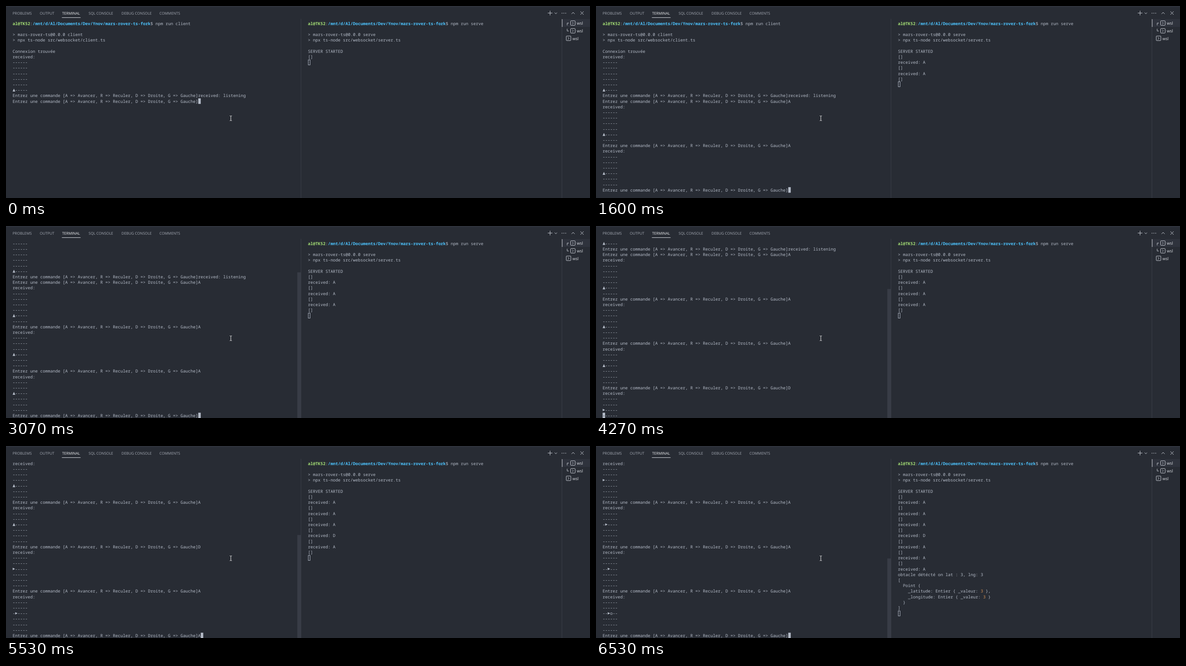
These frames come from a looping animation (1280x422 px, 8000 ms). An HTML page:

```html
<!DOCTYPE html>
<html lang="fr">
<head>
<meta charset="utf-8">
<title>Rover terminal</title>
<style>
  html, body { margin: 0; width: 100%; height: 100%; overflow: hidden; background: #282c34; }
  svg { display: block; }
  text { white-space: pre; text-rendering: geometricPrecision; }
  .term { font: 500 9.163px "Noto Sans Mono", "DejaVu Sans Mono", monospace; font-variant-ligatures: none; fill: #b4bbc7; }
  .ui { font: 8.1px "Open Sans", "Noto Sans", sans-serif; fill: #a4a9b3; }
  .ui .on { fill: #f0f1f3; }
  .ui .list { font-size: 9px; fill: #dcdfe4; }
  .user { font-weight: 700; fill: #a5e075; }
  .path { font-weight: 700; fill: #4dc4ff; }
  .num { fill: #d18f52; }
  .icon { fill: none; stroke: #c8ccd4; }
</style>
</head>
<body>
<svg width="1280" height="422" viewBox="0 0 1280 422">
  <rect width="1280" height="422" fill="#282c34"/>
  <rect y="1" width="1280" height="1" fill="#383c46"/>
  <g id="tabs" class="ui"></g>
  <rect x="122.5" y="25" width="41" height="1" fill="#d7dae0"/>
  <path d="M646.5 28V422M1218.5 28V422" stroke="#3a3e48"/>
  <rect x="1219" y="29" width="61" height="17" fill="#2f333d"/>
  <rect x="1218.5" y="29" width="1" height="17" fill="#d7dae0"/>
  <path class="icon" d="M1187.5 15.5h10M1192.5 10.5v10M1202.5 14.5l2.7 2.7 2.7-2.7M1239.5 17.5l3.5-3.5 3.5 3.5M1259 12l7 7M1266 12l-7 7"/>
  <path d="M1218 15h1.4v1.4h-1.4zM1222 15h1.4v1.4h-1.4zM1226 15h1.4v1.4h-1.4z" fill="#c8ccd4"/>
  <path class="icon" d="M1233.5 37.5h-3.5v5M1230 50v5h3.5"/>
  <g id="shells" class="ui"></g>
  <g id="client" class="term"></g>
  <g id="server" class="term"></g>
  <path d="M490.5 241.5h1.5l.8.8.8-.8h1.5M492.8 242v9.5M490.5 252h1.5l.8-.8.8.8h1.5" fill="none" stroke="#f2f2f2"/>
</svg>
<script>
const LOOP = 8000, ROWS = 32, COL = 5.498, PITCH = 12.2, TOP = 32.2;
const CLIENT_X = 14.5, SERVER_X = 661.7;
const ASK = "Entrez une commande [A => Avancer, R => Reculer, D => Droite, G => Gauche]";
const $ = id => document.getElementById(id);

// Each order: key, when it is typed, when output begins and ends, rover pose afterwards
const orders = [
  { key: "A", typed: 200, begin: 670, end: 670, row: 4, col: 0, rover: "▲" },
  { key: "A", typed: 1270, begin: 1530, end: 1600, row: 3, col: 0, rover: "▲" },
  { key: "A", typed: 2870, begin: 3070, end: 3070, row: 2, col: 0, rover: "▲" },
  { key: "D", typed: 4000, begin: 4270, end: 4330, row: 2, col: 0, rover: "►" },
  { key: "A", typed: 4870, begin: 5200, end: 5200, row: 2, col: 1, rover: "►" },
  { key: "A", typed: 5530, begin: 5800, end: 5870, row: 2, col: 2, rover: "►" },
  { key: "A", typed: 6270, begin: 6530, end: 6530, row: 2, col: 2, rover: "►", obstacle: true }
];

const span = (name, s) => `<tspan class="${name}">${s}</tspan>`;
const shell = cmd => span("user", "al@TK52") + ":" +
  span("path", "/mnt/d/Al/Documents/Dev/Ynov/mars-rover-ts-fork") + "$ npm run " + cmd;
const intro = (cmd, file) => [shell(cmd), "", `> mars-rover-ts@0.0.0 ${cmd}`,
  `> npx ts-node src/websocket/${file}.ts`, ""];

function map({ row, col, rover, obstacle }) {
  return Array.from({ length: 6 }, (_, r) => {
    if (r !== row) return "------";
    const cells = [..."------"];
    cells[col] = rover;
    if (obstacle) cells[col + 1] = "o";
    return cells.join("");
  });
}

const coordinate = name => `    _${name}: Entier { _valeur: ${span("num", 3)} }`;
const obstacleReport = ["obtacle détécté on lat : 3, lng: 3", "[", "  Point {",
  coordinate("latitude") + ",", coordinate("longitude"), "  }", "]"];

function clientState(t) {
  const lines = [...intro("client", "client"), "Connexion trouvée", "received:",
    ...map({ row: 5, col: 0, rover: "▲" }), ASK + "received: listening", ASK];
  let cursor = ASK.length;
  for (const o of orders) {
    if (t < o.typed) break;
    lines[lines.length - 1] += o.key;
    cursor = ASK.length + 1;
    if (t < o.begin) break;
    const grid = map(o);
    lines.push("received:");
    if (t < o.end) {
      lines.push(...grid.slice(0, 4));
      cursor = 0;
      break;
    }
    lines.push(...grid, ASK);
    cursor = ASK.length;
  }
  return { lines, cursor };
}

function serverLines(t) {
  const lines = [...intro("serve", "server"), "SERVER STARTED", "[]"];
  for (const o of orders) {
    if (t >= o.end) lines.push("received: " + o.key, ...(o.obstacle ? obstacleReport : ["[]"]));
  }
  return lines;
}

const rowTop = row => TOP + row * PITCH;

function drawLine(line, x, row) {
  const y = rowTop(row);
  const at = line.search(/[▲►]/);
  let arrow = "";
  if (at >= 0) {
    const ax = x + at * COL;
    arrow = line[at] === "▲"
      ? `<path d="M${ax} ${y + 9.4}h5.8l-2.9 -6.6z"/>`
      : `<path d="M${ax + .2} ${y + 3.6}v5.2l5.2 -2.6z"/>`;
  }
  return `<text x="${x}" y="${y + 9.5}">${line.replace(/[▲►]/, " ")}</text>${arrow}`;
}

function drawClient(t) {
  const { lines, cursor } = clientState(t);
  const first = Math.max(0, lines.length - ROWS);
  const last = lines.length - 1 - first;
  const x = CLIENT_X + cursor * COL, y = rowTop(last);
  let out = lines.slice(first).map((line, i) => drawLine(line, CLIENT_X, i)).join("");
  out += `<rect x="${x}" y="${y}" width="5.5" height="12.2"/>`;
  if (cursor === 0) out += `<text x="${x}" y="${y + 9.5}" fill="#282c34">-</text>`;
  if (first) {
    const thumb = 31.3 + 393 * first / lines.length;
    out += `<rect x="638.5" y="${thumb}" width="7.5" height="${422 - thumb}" fill="#383c46"/>`;
  }
  return out;
}

function drawServer(t) {
  const lines = serverLines(t);
  return lines.map((line, i) => drawLine(line, SERVER_X, i)).join("") +
    `<rect x="662.5" y="${Math.round(rowTop(lines.length)) + .5}" width="4" height="11" fill="none" stroke="#abb2bf"/>`;
}

$("tabs").innerHTML = [[14.5, "PROBLEMS"], [74, "OUTPUT"], [123, "TERMINAL"], [181, "SQL CONSOLE"],
  [253, "DEBUG CONSOLE"], [336.3, "COMMENTS"]]
  .map(([x, s]) => `<text x="${x}" y="18.7" class="${s === "TERMINAL" ? "on" : ""}">${s}</text>`).join("");

$("shells").innerHTML = [[1237.5, 32.5], [1237.5, 49.5], [1228, 66]].map(([x, y]) =>
  `<rect class="icon" x="${x}" y="${y}" width="10" height="10" rx="1"/>
   <path class="icon" d="M${x + 3.5} ${y + 2.5}l2.7 2.6 -2.7 2.6"/>
   <text class="list" x="${x + 13.5}" y="${y + 8.5}">wsl</text>`).join("");

const changes = orders.flatMap(o => [o.typed, o.begin, o.end]);
const start = performance.now();
let shown = -1;

function frame() {
  const t = (performance.now() - start) % LOOP;
  const step = changes.filter(c => c <= t).length;
  if (step !== shown) {
    shown = step;
    $("client").innerHTML = drawClient(t);
    $("server").innerHTML = drawServer(t);
  }
  requestAnimationFrame(frame);
}
frame();
</script>
</body>
</html>
```
